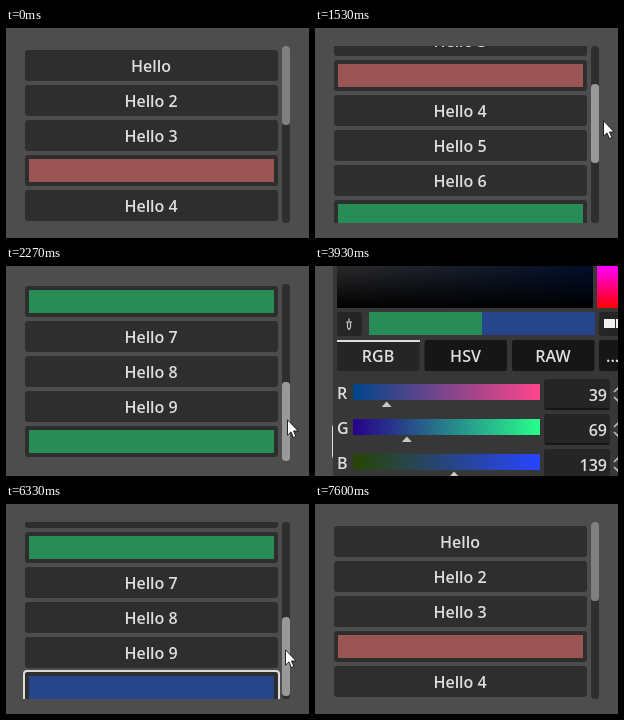
An HTML page for the animation above (8540 ms loop, 303x210 px).

```html
<!DOCTYPE html>
<html lang="en">
<head>
<meta charset="utf-8">
<title>Scrolling list with colour picker</title>
<style>
html, body { margin: 0; width: 100%; height: 100%; overflow: hidden; background: #4d4d4d; }
svg { display: block; width: 303px; height: 210px; }
text { font: 600 16px "Open Sans", "Noto Sans", sans-serif; fill: #dfdfdf; }
.mid { text-anchor: middle; }
.end { text-anchor: end; }
</style>
</head>
<body>
<svg viewBox="0 0 303 210">
  <defs>
    <clipPath id="view"><rect x="14" y="18" width="262" height="177"/></clipPath>
    <linearGradient id="sat"><stop stop-color="#2a2a2a"/><stop id="satEnd" offset="1"/></linearGradient>
    <linearGradient id="dark" x2="0" y2="1"><stop stop-opacity="0"/><stop offset="1"/></linearGradient>
    <linearGradient id="hue" x2="0" y2="1"><stop stop-color="#f0f"/><stop offset="1" stop-color="#f00"/></linearGradient>
  </defs>
  <g clip-path="url(#view)"><g id="list"></g></g>
  <rect x="276" y="18" width="8" height="177" rx="3.5" fill="#2e2e2e"/>
  <rect id="thumb" x="276" y="18" width="8" height="79" rx="3.5"/>
  <g id="picker"></g>
  <path id="cursor" d="M-.5-.2V15.2L3 11.9 5.4 17.6 7.9 16.5 5.5 11H10.2Z" fill="#fff" stroke="#111" stroke-width=".9"/>
</svg>
<script>
const LOOP = 8540, STEP = 1000 / 15;
const ROWS = 12, PITCH = 35, MAX_SCROLL = 247, TRAVEL = 98;
const RED = [155, 85, 85], GREEN = [40, 140, 87], BLUE = [39, 69, 139];

const $ = id => document.getElementById(id);
const rgb = c => `rgb(${c.map(Math.round)})`;
const ramp = (t, a, b) => Math.max(0, Math.min(1, (t - a) / (b - a)));
const between = (t, a, b) => t >= a && t < b;
const place = (id, x, y) => $(id).setAttribute("transform", `translate(${x} ${y})`);
const box = (x, y, w, h, fill, more = "") =>
  `<rect x="${x}" y="${y}" width="${w}" height="${h}" fill="${fill}" ${more}/>`;
const label = (x, y, s, cls = "mid") => `<text x="${x}" y="${y}" class="${cls}">${s}</text>`;

function buildList() {
  const last = ROWS - 1;
  let html = "", count = 0;
  for (let i = 0; i < ROWS; i++) {
    const y = 22 + PITCH * i;
    html += box(19, y, 253, 31, "#2e2e2e", 'rx="3"');
    if (i % 4 === 3) // every fourth row is a colour button
      html += box(23, y + 4, 245, 23, rgb(i === 3 ? RED : GREEN), i === last ? 'id="lastColor"' : "");
    else
      html += label(145, y + 22, ++count === 1 ? "Hello" : "Hello " + count);
  }
  $("list").innerHTML = html + box(18, 21 + PITCH * last, 255, 33, "none",
    'id="focus" rx="3" stroke="#fff" stroke-opacity=".8" stroke-width="2"');
}

function buildPicker() {
  const tab = (name, i) => {
    const x = 22 + 87.5 * i;
    return box(x, 74, 82.5, 31, i ? "#161616" : "#252525", 'rx="2"') + label(x + 41, 96, name);
  };
  const slider = (name, i) => {
    const y = 113 + PITCH * i;
    return `<linearGradient id="ramp${i}"><stop id="low${i}"/><stop id="high${i}" offset="1"/></linearGradient>` +
      label(22, y + 20, name, "") +
      box(38, y + 5, 187, 16, `url(#ramp${i})`) +
      `<path id="grip${i}" d="M0 ${y + 22.5}l5 5.5h-10z" fill="#c8c8c8"/>` +
      box(229, y, 66, 31, "#252525", 'rx="3"') + box(230, y + 29, 64, 2, "#161616") +
      `<text id="num${i}" x="292" y="${y + 22}" class="end"></text>` +
      `<path d="M299 ${y + 13}l3.5-3.5 3.5 3.5M299 ${y + 18}l3.5 3.5 3.5-3.5" fill="none" stroke="#bbb" stroke-width="1.6"/>`;
  };
  $("picker").innerHTML =
    box(18, -5, 290, 220, "#373737") +
    box(22, 0, 256, 42, "url(#sat)") + box(22, 0, 256, 42, "url(#dark)") +
    box(282, 0, 21, 42, "url(#hue)") +
    box(22, 46, 25, 24, "#252525", 'rx="3"') +
    '<path d="M32.5 56.5v5l1.5 2 1.5-2v-5M31 56h6M34 52.5v3" fill="none" stroke="#c4c4c4" stroke-width="1.2"/>' +
    box(54, 46, 113, 23, rgb(GREEN)) + box(167, 46, 113, 23, "", 'id="newColor"') +
    box(284, 46, 24, 24, "#252525", 'rx="3"') +
    box(289, 53, 11, 9, "#f0f0f0") + box(301, 53, 2, 9, "#f0f0f0") +
    ["RGB", "HSV", "RAW"].map(tab).join("") + box(22, 74, 83, 2, "#dcdcdc") +
    box(284, 74, 25, 31, "#161616", 'rx="2"') + label(291, 96, "...", "") +
    ["R", "G", "B"].map(slider).join("");
}

function setColor(c) {
  const lo = Math.min(...c), span = Math.max(...c) - lo;
  $("satEnd").setAttribute("stop-color", rgb(c.map(v => (v - lo) / span * 42)));
  $("newColor").setAttribute("fill", rgb(c));
  $("lastColor").setAttribute("fill", rgb(c));
  c.forEach((v, i) => {
    const at = n => rgb(c.map((u, k) => k === i ? n : u));
    $("low" + i).setAttribute("stop-color", at(0));
    $("high" + i).setAttribute("stop-color", at(255));
    place("grip" + i, 45.3 + v * 0.675, 0);
    $("num" + i).textContent = v;
  });
}

// Two drags: down to the end, later back to the top.
const dragDown = t => ramp(t, 1074, 2267);
const dragUp = t => ramp(t, 6303, 7226);

function pointer(t, thumb) {
  if (t < 3600) {
    const enter = ramp(t, 467, 667), drag = dragDown(t);
    const toRow = ramp(t, 2333, 2933), leave = ramp(t, 3200, 3533);
    return [
      310 - 25 * enter + 5.5 * Math.sin(Math.PI * drag) - 3 * drag - 13 * toRow - 73 * leave,
      55.6 + 13 * (1 - enter) + thumb + 16 * toRow - 200 * leave
    ];
  }
  const enter = ramp(t, 5467, 5733), leave = ramp(t, 7267, 7600);
  return [
    310 - 27 * enter - 3 * ramp(t, 6067, 6303) - 1.5 * dragUp(t) + 32 * leave,
    51.7 + 12 * (1 - enter) + thumb + 8 * leave
  ];
}

function draw(time) {
  const t = Math.floor((time % LOOP + 4) / STEP) * STEP;
  const p = dragDown(t) - dragUp(t);
  const held = between(t, 599, 2399) || between(t, 5666, 7333);
  place("list", 0, -Math.round(MAX_SCROLL * p));
  $("thumb").setAttribute("y", 18 + Math.round(TRAVEL * p));
  $("thumb").setAttribute("fill", held ? "#999" : "#808080");
  place("cursor", ...pointer(t, TRAVEL * p).map(Math.round));
  $("focus").style.display = t >= 2999 ? "" : "none";
  $("picker").style.display = between(t, 3133, 4599) ? "" : "none";
  setColor(t >= 3933 ? BLUE : GREEN);
}

buildList();
buildPicker();
const start = performance.now();
function frame() {
  draw(performance.now() - start);
  requestAnimationFrame(frame);
}
frame();
</script>
</body>
</html>
```
